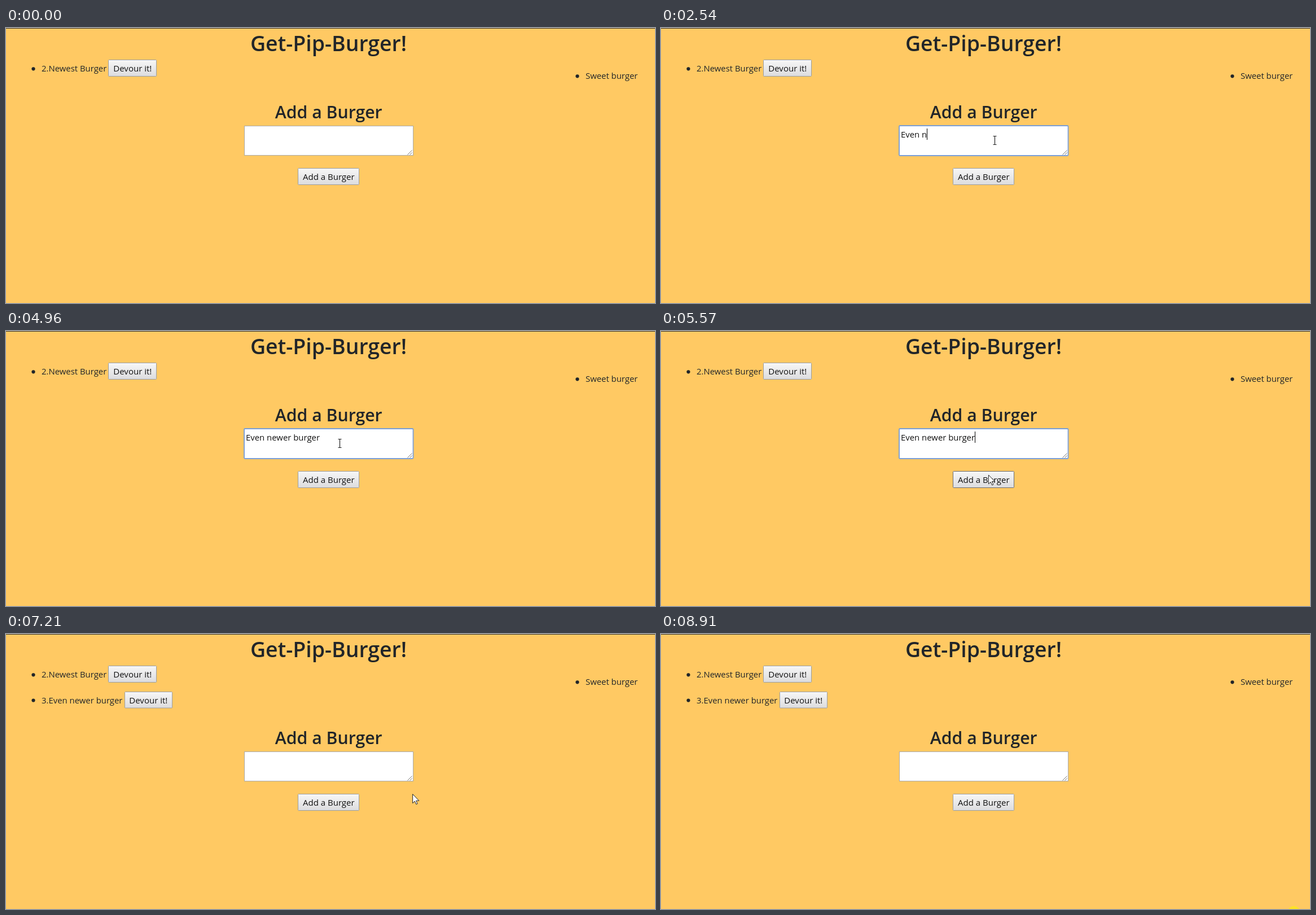
Recreate the animation shown at these times as an HTML page. Size 1150 by 487 pixels, loop 8.99 s.

```html
<!DOCTYPE html>
<html lang="en">
<head>
<meta charset="utf-8">
<title>Add a Burger</title>
<style>
  html, body { margin: 0; width: 100%; height: 100%; overflow: hidden; background: #ffc963; }
  svg { display: block; }
  text { font: 14.9px "Open Sans", "Noto Sans", sans-serif; fill: #212529; white-space: pre; }
  .h1 { font-size: 37.4px; font-weight: 600; text-anchor: middle; }
  .h2 { font-size: 30.2px; font-weight: 600; text-anchor: middle; }
  .btn text { font-size: 15px; fill: #111; text-anchor: middle; }
  .btn rect { fill: url(#face); stroke: #9a9da0; }
  .btn.hover rect { stroke: #696b6e; }
  .btn.down rect { fill: url(#pressed); }
  .dot { fill: #212529; }
  #typed { fill: #111; }
</style>
</head>
<body>
<svg width="1150" height="487" viewBox="0 0 1150 487">
  <defs>
    <linearGradient id="face" x2="0" y2="1">
      <stop stop-color="#f7f7f7"/><stop offset="1" stop-color="#dcdcde"/>
    </linearGradient>
    <linearGradient id="pressed" x2="0" y2="1">
      <stop stop-color="#d8d8da"/><stop offset="1" stop-color="#f0f0f0"/>
    </linearGradient>
  </defs>
  <rect width="1150" height="487" fill="#ffc963"/>
  <rect width="1150" height="1" fill="#303030"/>
  <text class="h1" x="571.5" y="41">Get-Pip-Burger!</text>

  <circle class="dot" cx="48.5" cy="72.3" r="3.1"/>
  <text x="63" y="77">2.Newest Burger</text>
  <g class="btn">
    <rect x="181.5" y="56.5" width="85" height="29" rx="1"/>
    <text x="224.3" y="77">Devour it!</text>
  </g>
  <circle class="dot" cx="1012.4" cy="85.3" r="3.1"/>
  <text x="1027" y="90">Sweet burger</text>

  <g id="newRow">
    <circle class="dot" cx="48.5" cy="117.5" r="3.1"/>
    <text x="63" y="122.5">3.Even newer burger</text>
    <g class="btn">
      <rect x="210.5" y="102.5" width="84" height="28.5" rx="1"/>
      <text x="252.3" y="122.5">Devour it!</text>
    </g>
  </g>

  <g id="form">
    <text class="h2" x="571.7" y="159.6">Add a Burger</text>
    <rect x="422.5" y="173.5" width="299" height="52" fill="#fff" stroke="#a9a9a9"/>
    <path d="M711.5 224.5l8-8M715.5 224.5l4-4" stroke="#777" fill="none"/>
    <rect id="ring" x="422" y="173" width="299.5" height="53" rx="1.5" fill="none" stroke="#7b9fd6" stroke-width="1.8"/>
    <text id="typed" x="425" y="194"></text>
    <rect id="caret" y="178" width="1" height="20"/>
    <g class="btn" id="add">
      <rect x="517.5" y="248.5" width="108" height="29" rx="1"/>
      <text x="571.8" y="269">Add a Burger</text>
    </g>
  </g>

  <circle id="halo" r="11.5" fill="#ffe81c" fill-opacity=".85"/>
  <path id="arrow" d="M.5.5V16.5L4.2 13 6.7 18.5 9 17.5 6.600 12.100H11.700Z" fill="#fff" stroke="#222"/>
  <path id="beam" d="M-3-7.5H3M0-7.5V7.500M-3 7.500H3" fill="none" stroke="#222" stroke-width="1.2"/>
</svg>
<script>
const LOOP = 8990;
const FOCUS = 930, PRESS = 5770, RELEASE = 5880, RELOAD = 7010, EXIT = 8360, LAST_CLICK = 8910;

// Each word is typed at an even pace between its first and last key
const words = [
  { text: "Even ", from: 1630, to: 2160 },
  { text: "newer ", from: 2540, to: 3570 },
  { text: "burger", from: 3930, to: 4410 }
];

const entry = { x: 995, y: 478 }, bend = { x: 617, y: 341 };
const field = { x: 591.5, y: 199 }, button = { x: 579, y: 259 };
const rest = { x: 573, y: 264 }, aside = { x: 727, y: 284 };
const pause = { x: 899, y: 340 }, exit = { x: 1057, y: 486 };
const moves = [
  { from: 250, to: 900, a: entry, b: field, via: bend },
  { from: 4980, to: 5700, a: field, b: button },
  { from: 6470, to: 6510, a: button, b: rest },
  { from: RELOAD, to: 7240, a: rest, b: aside },
  { from: 7570, to: 7730, a: aside, b: pause },
  { from: 7950, to: EXIT, a: pause, b: exit }
];

const [newRow, form, ring, typed, caret, add, halo, arrow, beam] =
  ["newRow", "form", "ring", "typed", "caret", "add", "halo", "arrow", "beam"]
    .map(id => document.getElementById(id));
const within = (v, a, b) => v >= a && v < b;
const progress = (t, a, b) => Math.min(1, Math.max(0, (t - a) / (b - a)));
const mix = (a, b, k) => ({ x: a.x + (b.x - a.x) * k, y: a.y + (b.y - a.y) * k });
const easeOut = k => 1 - (1 - k) ** 1.5;
const show = (el, on) => el.style.display = on ? "" : "none";
const moveTo = (el, p) => el.setAttribute("transform", `translate(${p.x} ${p.y})`);

function pointerAt(t) {
  if (!within(t, moves[0].from, EXIT)) return null;
  const { from, to, a, b, via } = moves.filter(m => m.from <= t).pop();
  const k = easeOut(progress(t, from, to));
  return via ? mix(mix(a, via, k), mix(via, b, k), k) : mix(a, b, k);
}

function textAt(t) {
  return words.map(({ text, from, to }) => {
    const count = t < from ? 0 : 1 + Math.floor(progress(t, from, to) * (text.length - 1));
    return text.slice(0, count);
  }).join("");
}

// Solid while typing, otherwise blinking
function caretAt(t) {
  const idle = t < words[0].from ? t - FOCUS : t - words[2].to;
  return within(t, FOCUS, PRESS) && (idle < 0 || idle % 1100 < 550);
}

function render(t) {
  const loaded = t >= RELOAD;
  show(newRow, loaded);
  moveTo(form, { x: 0, y: loaded ? 35 : 0 });
  show(ring, within(t, FOCUS, PRESS));

  typed.textContent = loaded ? "" : textAt(t);
  const caretOn = caretAt(t);
  show(caret, caretOn);
  if (caretOn) {
    const width = typed.textContent ? typed.getComputedTextLength() : 0;
    caret.setAttribute("x", Math.round(425.2 + width));
  }

  const p = pointerAt(t);
  const over = (x0, x1, y0, y1) =>
    !!p && !loaded && within(p.x, x0, x1) && within(p.y, y0, y1);
  const overText = over(422, 722, 173, 226);
  add.classList.toggle("hover", over(517, 626, 248, 278));
  add.classList.toggle("down", within(t, PRESS, RELEASE));
  show(arrow, p && !overText);
  show(beam, overText);
  if (p) moveTo(overText ? beam : arrow, p);

  const clicking = [FOCUS, PRESS, LAST_CLICK].some(c => within(t, c, c + 100));
  show(halo, clicking);
  if (clicking) moveTo(halo, p || { x: 1121.5, y: 493.5 });
}

const start = performance.now();
function tick() {
  render((performance.now() - start) % LOOP);
  requestAnimationFrame(tick);
}
tick();
</script>
</body>
</html>
```
